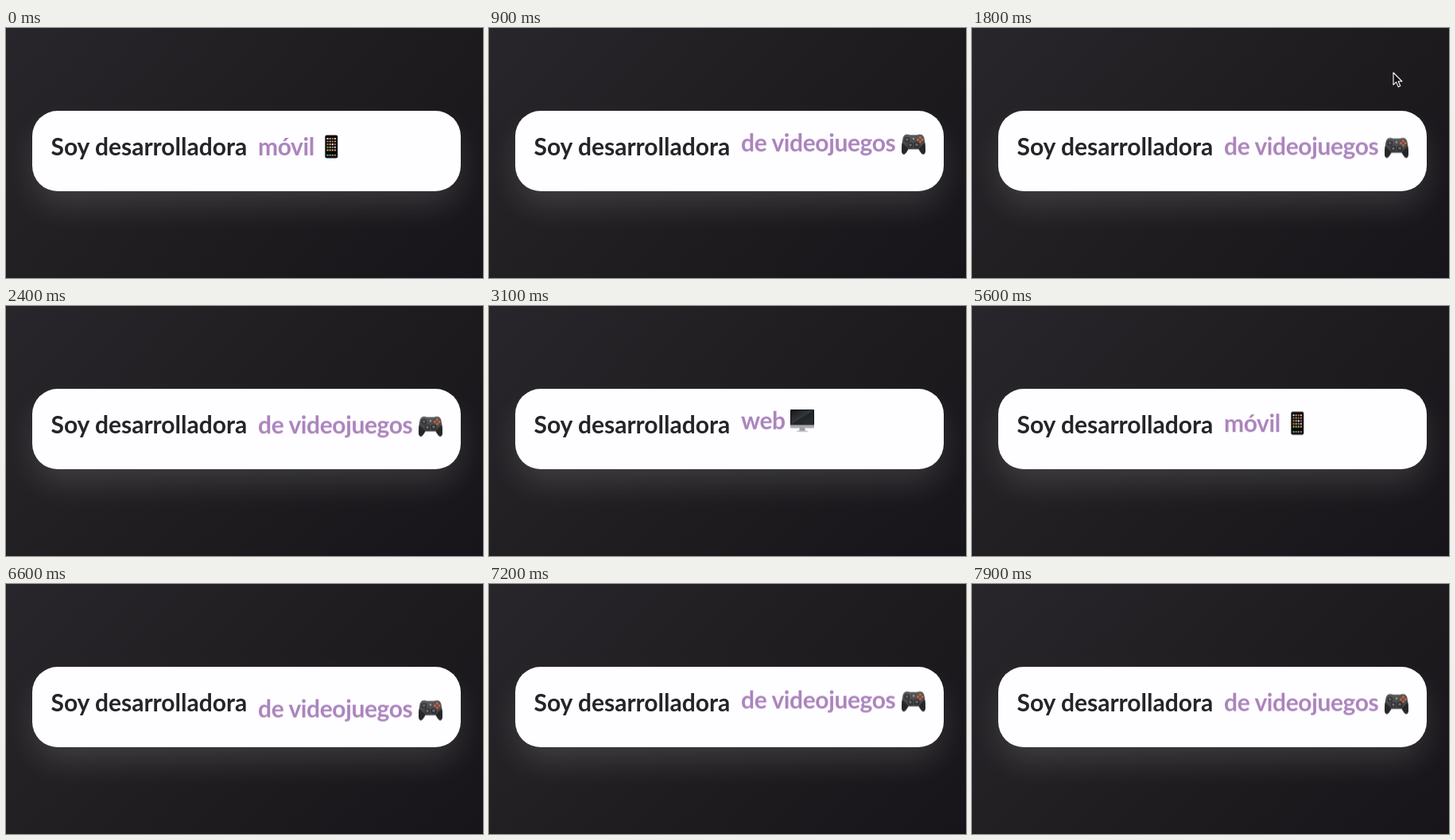
Recreate the animation shown at these times as an HTML page. Size 600 by 314 pixels, loop 8 s.

```html
<!DOCTYPE html>
<html lang="es">
<head>
<meta charset="utf-8">
<title>Soy desarrolladora</title>
<style>
  html, body { margin: 0; width: 100%; height: 100%; overflow: hidden; }
  body { position: relative; background: linear-gradient(135deg, #28262a 0%, #1f1d20 50%, #171519 100%); }
  .card {
    position: absolute; left: 33px; top: 104px; width: 539px; height: 100.5px;
    border-radius: 32px; background: #fefdff;
    box-shadow: 0 20px 40px -4px rgba(255, 255, 255, .14);
  }
  svg.stage { position: absolute; left: 0; top: 0; width: 600px; height: 314px; display: block; }
  text { font: 700 30px Lato, "Open Sans", sans-serif; fill: #252428; white-space: pre; }
  .word { fill: #ab84bd; letter-spacing: -.4px; }
</style>
</head>
<body>
<div class="card"></div>
<svg class="stage" viewBox="0 0 600 314">
  <defs>
    <clipPath id="window"><rect x="310" y="130" width="262" height="49.5"/></clipPath>
    <linearGradient id="screen" x1="0" y1="0" x2="1" y2="1">
      <stop offset="0" stop-color="#15171a"/><stop offset=".5" stop-color="#34383d"/>
      <stop offset=".52" stop-color="#202327"/><stop offset="1" stop-color="#2d3034"/>
    </linearGradient>
    <linearGradient id="metal" x1="0" y1="0" x2="0" y2="1">
      <stop offset="0" stop-color="#d9dadc"/><stop offset="1" stop-color="#a4a6aa"/>
    </linearGradient>
    <linearGradient id="shell" x1="0" y1="0" x2="0" y2="1">
      <stop offset="0" stop-color="#5a5a5c"/><stop offset="1" stop-color="#353537"/>
    </linearGradient>

    <g id="phone">
      <rect x=".3" y="0" width="16" height="29" rx="2.2" fill="#161719"/>
      <rect x="1.5" y="1.3" width="13.6" height="26.4" rx="1.4" fill="#050608"/>
      <g id="apps"></g>
    </g>

    <g id="monitor">
      <path d="M12 23h6l1 4.2h-8z" fill="#9b9da1"/>
      <rect x="8" y="26.7" width="14" height="1.5" rx=".6" fill="#c1c2c5"/>
      <rect x="0" y="0" width="30" height="23.4" rx="1.2" fill="url(#metal)"/>
      <path d="M0 1.2Q0 0 1.2 0h27.6Q30 0 30 1.2V19.6H0z" fill="#111214"/>
      <rect x="1" y="1" width="28" height="17.7" fill="url(#screen)"/>
    </g>

    <g id="gamepad">
      <path d="M5 .8Q8 -.2 10.5 1.3h9Q22 -.2 25 .8Q27.8 2 28.6 6Q30.2 14 30 21Q29.8 25.6 27 25.8Q24.8 25.6 21.5 19.3H8.5Q5.2 25.6 3 25.8Q.2 25.6 0 21Q-.2 14 1.4 6Q2.2 2 5 .8Z" fill="url(#shell)"/>
      <path d="M.8 11Q-.3 18 .3 22.5Q1.4 26.5 4.2 24.3L8.5 18.5Zm28.4 0Q30.3 18 29.7 22.5Q28.6 26.5 25.8 24.3L21.5 18.5Z" fill="#262628"/>
      <circle cx="6.8" cy="7.3" r="3.2" fill="#28292c"/><circle cx="6.8" cy="7.1" r="2" fill="#606164"/>
      <circle cx="19" cy="13.8" r="3.3" fill="#242528"/><circle cx="19" cy="13.5" r="2.1" fill="#626366"/>
      <circle cx="11" cy="13.8" r="3.1" fill="#28292c"/>
      <path d="M11 11.7v4.2M8.9 13.8h4.2" stroke="#737477" stroke-width="1.3"/>
      <circle cx="15" cy="6" r="1.2" fill="#a0a1a3"/>
      <g fill="#d7643c">
        <circle cx="23.4" cy="4.5" r="1.45"/><circle cx="23.4" cy="10" r="1.45"/>
        <circle cx="20.6" cy="7.2" r="1.45"/><circle cx="26.1" cy="7.2" r="1.45"/>
      </g>
    </g>
  </defs>

  <text x="56.5" y="160">Soy desarrolladora</text>
  <g clip-path="url(#window)"><g id="column"></g></g>
  <path id="cursor" d="M0 0V15.3L3.6 11.9L6.2 17.9L8.8 16.8L6.2 11H10.9Z"
        fill="#131315" stroke="#fff" stroke-width="1.1" stroke-linejoin="round" opacity="0"/>
</svg>
<script>
  const LOOP = 8000, ROW = 52, OVERSHOOT = 6, RISE = 800;
  const NS = "http://www.w3.org/2000/svg";

  function add(parent, tag, attrs, text = "") {
    const el = document.createElementNS(NS, tag);
    for (const key in attrs) el.setAttribute(key, attrs[key]);
    el.textContent = text;
    parent.append(el);
    return el;
  }

  // App icons on the phone
  const apps = document.getElementById("apps");
  const tints = ["#d9dde0", "#58a7d8", "#dca445", "#62b96b", "#d2625c", "#8b8e94"];
  for (let row = 0; row < 6; row++) {
    for (let col = 0; col < 4; col++) {
      const dock = row === 5;
      add(apps, "rect", {
        x: 2.5 + col * 3.1, y: dock ? 24.3 : 3.5 + row * 3.6,
        width: 2.1, height: 2.1, rx: .5,
        fill: dock ? ["#55c169", "#4a9ee0", "#62c36c", "#df6a59"][col] : tints[(row * 5 + col * 2 + row * col) % 6]
      });
    }
  }

  // Words stacked in a column, one row each
  const words = {
    mobile: ["móvil", "phone", 401, 134.7],
    games: ["de videojuegos", "gamepad", 519, 138.3],
    web: ["web", "monitor", 379, 135.3]
  };
  const column = document.getElementById("column");
  ["mobile", "games", "web", "mobile", "games", "web"].forEach((name, i) => {
    const [label, icon, x, y] = words[name];
    const row = add(column, "g", { transform: `translate(0 ${i * ROW})` });
    add(row, "text", { x: 317, y: 160, class: "word" }, label);
    add(row, "use", { href: "#" + icon, x, y });
  });

  // Each step rises past its row, then settles until the next one
  const shift = (time, y, easing = "ease") =>
    ({ offset: time / LOOP, transform: `translateY(${y}px)`, easing });
  const steps = [shift(0, -.3, "linear")];
  [225, 2400, 4420, 6225].forEach((start, i) => {
    steps.push(shift(start, -i * ROW), shift(start + RISE, -(i + 1) * ROW - OVERSHOOT));
  });
  // The final settle is still under way when the loop restarts
  steps.push(shift(7500, -4 * ROW - 2.6, "ease-out"), shift(LOOP, -4 * ROW - .5));
  column.animate(steps, { duration: LOOP, iterations: Infinity });

  // Pointer visit: time, x, y, visible
  const visit = [
    [0, 571, 74, 0], [1600, 571, 74, 1], [1700, 545, 60, 1], [1800, 530, 56, 1],
    [1900, 535, 53, 1], [2000, 562, 57, 1], [2100, 590, 63, 1], [2200, 602, 66, 0], [LOOP, 602, 66, 0]
  ];
  document.getElementById("cursor").animate(visit.map(([time, x, y, opacity]) => ({
    offset: time / LOOP, transform: `translate(${x}px, ${y}px)`, opacity, easing: "step-end"
  })), { duration: LOOP, iterations: Infinity });
</script>
</body>
</html>
```
